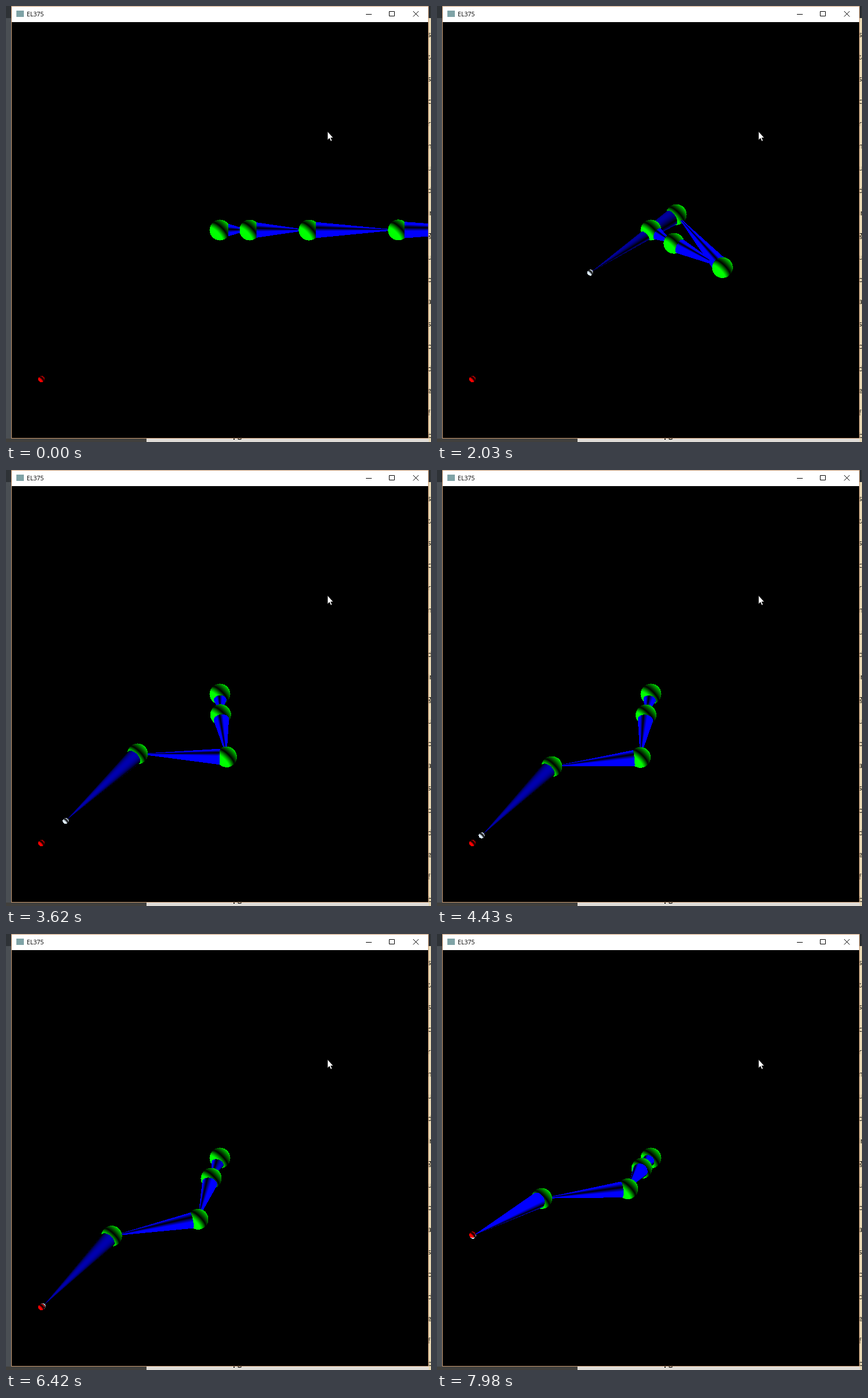
Animation of 738x758 px, one loop 8 s. Source, as an HTML page with a canvas:

```html
<!DOCTYPE html>
<html lang="en">
<head>
<meta charset="utf-8">
<title>Arm</title>
<style>
html, body { margin: 0; width: 738px; height: 758px; overflow: hidden; background: #4a4f54; }
svg, canvas { position: absolute; left: 0; top: 0; display: block; }
canvas { left: 10px; top: 28px; }
text { font-family: "Open Sans", sans-serif; font-size: 13px; }
</style>
</head>
<body>
<svg width="738" height="758" viewBox="0 0 738 758">
  <rect width="738" height="758" fill="#4a4f54"/>
  <rect width="738" height="21" fill="#2e3236"/>
  <rect y="752" width="244" height="6" fill="#41403d"/>
  <rect x="244" y="752" width="494" height="6" fill="#dfdcd7"/>
  <rect x="734" y="21" width="4" height="737" fill="#e6d6b2"/>
  <text x="394" y="751" font-weight="700">pg</text>
  <g id="side"></g>
  <rect x="9.5" y="0.5" width="724" height="751" fill="#000" stroke="#c99a72"/>
  <rect x="10" y="1" width="723" height="27" fill="#fff"/>
  <rect x="18" y="8" width="13" height="11" fill="#7fa3a6"/>
  <text x="36" y="18" style="font-size:10.6px">EL375</text>
  <path d="M625 14.5h10M665.5 9.5h9v8h-9zM707 9l9.5 9.5M716.5 9l-9.5 9.5" fill="none" stroke="#000"/>
</svg>
<canvas id="view" width="723" height="723"></canvas>
<svg width="738" height="758" viewBox="0 0 738 758">
  <path d="M558.5 218.5v14.2l3.2-3 2.3 5.2 2-.9-2.2-5h4.2z" fill="#fff" stroke="#222" stroke-width=".5"/>
</svg>
<script>
const LOOP = 8000, SIZE = 723, MID = 361.5, RAD = Math.PI / 180;
const LENGTHS = [51.6, 103.2, 155, 206];
const LIGHT = [-0.678, 0.678, 0.285];
const BALL = { r: 18, color: [0, 255, 0], front: 1.8, back: 1 };
const BONE = { r: 15, color: [0, 0, 255], front: 3, back: 3 };
const HAND = { r: 5.2, color: [225, 240, 255], front: 1.8, back: 1.2 };
const GOAL = { r: 5.5, color: [255, 0, 0], front: 1.8, back: 1, at: [-310, 259, 254] };

// In degrees per bone: turn in the picture plane, tilt towards the viewer
const POSES = [
  { t: 0, turn: [0, 0, 0, 0], tilt: [0, 0, 0, 0] },
  { t: 1200, turn: [8, 11, -58, -129], tilt: [11, 9, -40, -38] },
  { t: 2030, turn: [30, 26.6, -131, -214], tilt: [26.6, 24, -38, 29] },
  { t: 3620, turn: [88, 82, -178, -223], tilt: [46, 44, -4, 34] }
];
const REST = { turn: [114.6, 109.4, -191.8, -225.7], tilt: [42, 43.5, 10.6, 34] };
const SETTLE = 960;
const ORBIT = { from: 6850, to: 7980, angle: 24 * RAD };

document.getElementById("side").innerHTML =
  "s ta s c rs m ug d in g u ov a st o d e f b".split(" ").map((s, i) =>
    `<text x="732" y="${54 + i * 38.7}">${s}</text>`).join("");

const ctx = document.getElementById("view").getContext("2d");
const image = ctx.createImageData(SIZE, SIZE);
const pixels = new Uint32Array(image.data.buffer);
const depth = new Float32Array(SIZE * SIZE);

// Smooth through the poses, then settle exponentially
function angleAt(t, kind, bone) {
  const last = POSES.length - 1;
  const value = i => POSES[i][kind][bone];
  const secant = i => (value(i + 1) - value(i)) / (POSES[i + 1].t - POSES[i].t);
  const slope = i => {
    if (i === 0) return secant(0);
    if (i === last) return (REST[kind][bone] - value(i)) / SETTLE;
    const a = secant(i - 1), b = secant(i);
    return a * b > 0 ? 2 * a * b / (a + b) : 0;
  };
  if (t >= POSES[last].t) {
    const rest = REST[kind][bone];
    return rest + (value(last) - rest) * Math.exp((POSES[last].t - t) / SETTLE);
  }
  let i = 0;
  while (t >= POSES[i + 1].t) i++;
  const span = POSES[i + 1].t - POSES[i].t;
  const u = (t - POSES[i].t) / span, v = 1 - u;
  return value(i) * v * v * (1 + 2 * u) + value(i + 1) * u * u * (3 - 2 * u) +
    span * u * v * (slope(i) * v - slope(i + 1) * u);
}

function joints(t) {
  const list = [[0, 0, 0]];
  LENGTHS.forEach((len, i) => {
    const turn = angleAt(t, "turn", i) * RAD, tilt = angleAt(t, "tilt", i) * RAD;
    const [x, y, z] = list[i], flat = len * Math.cos(tilt);
    list.push([x + flat * Math.cos(turn), y + flat * Math.sin(turn), z + len * Math.sin(tilt)]);
  });
  return list;
}

function orbit(t) {
  const u = (t - ORBIT.from) / (ORBIT.to - ORBIT.from);
  return ORBIT.angle * Math.min(1, Math.max(0, u)) ** 1.4;
}

function plot(at, z, nx, ny, nz, { color: [r, g, b], front, back }) {
  if (z <= depth[at]) return;
  depth[at] = z;
  const dot = nx * LIGHT[0] + ny * LIGHT[1] + nz * LIGHT[2];
  const lit = Math.min(1, dot > 0 ? dot * front : -dot * back);
  pixels[at] = (255 << 24) | (b * lit << 16) | (g * lit << 8) | (r * lit);
}

// Calls fn with the index and centred position of every pixel in a box
function scan(x0, y0, x1, y1, fn) {
  const lo = v => Math.max(0, Math.floor(v + MID));
  const hi = v => Math.min(SIZE - 1, Math.ceil(v + MID));
  for (let py = lo(y0); py <= hi(y1); py++)
    for (let px = lo(x0); px <= hi(x1); px++)
      fn(py * SIZE + px, px + 0.5 - MID, py + 0.5 - MID);
}

function sphere([cx, cy, cz], look) {
  const r = look.r;
  scan(cx - r, cy - r, cx + r, cy + r, (at, x, y) => {
    const dx = x - cx, dy = y - cy, left = r * r - dx * dx - dy * dy;
    if (left < 0) return;
    const dz = Math.sqrt(left);
    plot(at, cz + dz, dx / r, dy / r, dz / r, look);
  });
}

function cone(base, tip, look) {
  const r = look.r, axis = tip.map((v, i) => v - base[i]);
  const len = Math.hypot(...axis), k = r / len;
  const [ax, ay, az] = axis.map(v => v / len);
  const a = 1 - az * az * (1 + k * k);
  const [bx, by, bz] = base, [tx, ty] = tip;
  scan(Math.min(bx - r, tx), Math.min(by - r, ty), Math.max(bx + r, tx), Math.max(by + r, ty), (at, x, y) => {
    const qx = x - bx, qy = y - by;
    const h0 = qx * ax + qy * ay, w = r - k * h0;
    const b = az * (w * k - h0);
    const disc = b * b - a * (qx * qx + qy * qy - h0 * h0 - w * w);
    if (disc < 0) return;
    const root = Math.sqrt(disc);
    for (const s of [root, -root]) {
      const z = (s - b) / a, h = h0 + az * z;
      if (h < 0 || h > len) continue;
      const m = (r - k * h) * k - h;
      const nx = qx + m * ax, ny = qy + m * ay, nz = z + m * az;
      const n = Math.hypot(nx, ny, nz) || 1;
      plot(at, bz + z, nx / n, ny / n, nz / n, look);
    }
  });
}

function draw(t) {
  pixels.fill(0xff000000);
  depth.fill(-1e6);
  const angle = orbit(t), c = Math.cos(angle), s = Math.sin(angle);
  const view = ([x, y, z]) => [x, y * c - z * s, y * s + z * c];
  const arm = joints(t).map(view);
  for (let i = 0; i < LENGTHS.length; i++) {
    sphere(arm[i], BALL);
    cone(arm[i], arm[i + 1], BONE);
  }
  sphere(arm[LENGTHS.length], HAND);
  sphere(view(GOAL.at), GOAL);
  ctx.putImageData(image, 0, 0);
}

function loop() {
  draw(performance.now() % LOOP);
  requestAnimationFrame(loop);
}
loop();
</script>
</body>
</html>
```
